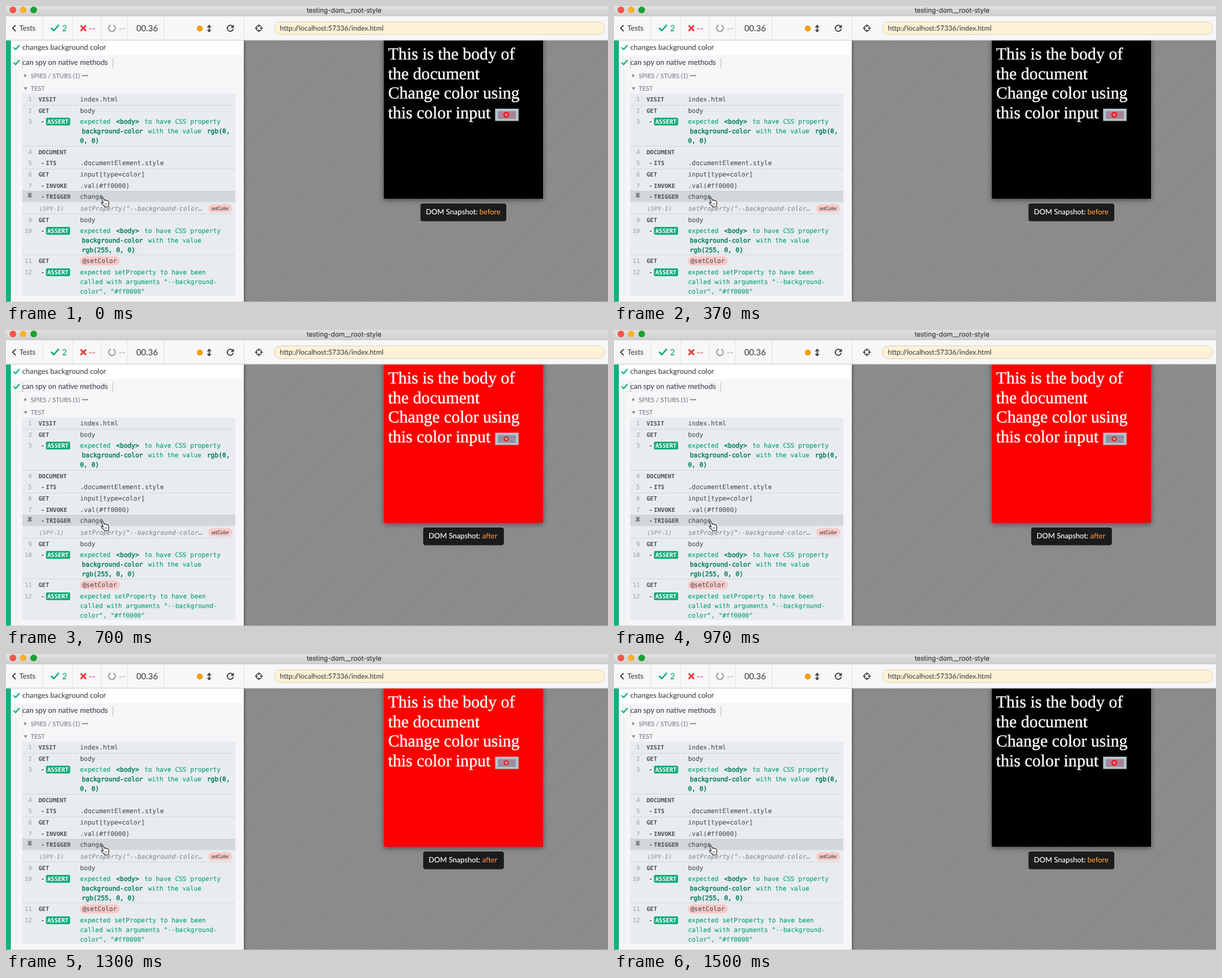
Animation, 1000 px wide and 493 px high, one loop 1530 ms. Source, as an HTML page:

```html
<!DOCTYPE html>
<html lang="en">
<head>
<meta charset="utf-8">
<title>Test runner</title>
<style>
  html, body { margin: 0; width: 100%; height: 100%; overflow: hidden; }
  svg { display: block; width: 1000px; height: 493px; }
  text { font: 12.2px Lato, sans-serif; color: #4a4b50; fill: currentColor; stroke: currentColor; stroke-width: .15; white-space: pre; text-rendering: geometricPrecision; }
  .mono { font: 10.52px "DejaVu Sans Mono", monospace; color: #555a5f; }
  .name { font: bold 9.75px "DejaVu Sans Mono", monospace; color: #4c5055; stroke-width: 0; }
  .num { font: 10px "DejaVu Sans Mono", monospace; color: #a6abb0; }
  .ok { color: #10a575; }
  .code { color: #08805a; stroke-width: .5; }
  .spy { font-style: italic; font-weight: normal; color: #8b9095; }
  .head { font-size: 10.3px; color: #808288; }
  .page { font: 28.1px "Liberation Serif", serif; color: #fff; stroke-width: .4; }
  .line { fill: none; stroke-linecap: round; stroke-linejoin: round; }
</style>
</head>
<body>
<svg viewBox="0 0 1000 493">
  <defs>
    <linearGradient id="bar" x2="0" y2="1">
      <stop stop-color="#e2e1e2"/><stop offset="1" stop-color="#d0cfd0"/>
    </linearGradient>
    <linearGradient id="edge">
      <stop stop-opacity=".28"/><stop offset="1" stop-opacity="0"/>
    </linearGradient>
    <pattern id="hatch" width="3.6" height="3.6" patternUnits="userSpaceOnUse" patternTransform="rotate(45)">
      <rect width="3.6" height="3.6" fill="#929292"/><rect width="1.4" height="3.6" fill="#808080"/>
    </pattern>
    <filter id="shadow" x="-10%" y="-10%" width="120%" height="120%">
      <feDropShadow dx="0" dy="2" stdDeviation="4" flood-opacity=".5"/>
    </filter>
    <path id="check" class="line" d="M1 5l3 3 6-7" stroke="#0fb17c" stroke-width="2.1" stroke-linecap="butt"/>
  </defs>

  <!-- preview -->
  <rect x="395" y="57" width="605" height="436" fill="url(#hatch)"/>
  <rect x="395" y="57" width="5" height="436" fill="url(#edge)"/>
  <rect id="sheet" x="627.7" y="50" width="264.3" height="271" filter="url(#shadow)"/>
  <g id="copy"></g>
  <rect x="812.5" y="171" width="39" height="20.5" fill="#b3c5c9"/>
  <rect id="swatch" x="817.5" y="175.5" width="29" height="12" stroke="#8c9aaa"/>
  <circle id="dot" cx="831" cy="181.3" fill="#e5202a"/>
  <circle cx="831" cy="181.3" r="1.5" fill="#e5202a" stroke="#fff"/>
  <rect id="tip" y="329" height="29.5" rx="4" fill="#1b1b1d"/>
  <text id="label" y="347" style="color:#fff">DOM Snapshot: <tspan id="state"></tspan></text>

  <!-- test list -->
  <rect y="57" width="395" height="436" fill="#f6f5f8"/>
  <rect x="8" y="57" width="387" height="25" fill="#fff"/>
  <rect y="57" width="8" height="436" fill="#0fb17c"/>
  <path d="M16.5 105V490" stroke="#e4e4e8"/>
  <use href="#check" x="12" y="64.5"/>
  <use href="#check" x="12" y="89.5"/>
  <text x="27" y="73">changes background color</text>
  <text x="27" y="98">can spy on native methods</text>
  <path d="M27.5 87V103M177.5 87V103" stroke="#777" stroke-dasharray="1 1.5"/>
  <path d="M30.5 113l4 3-4 3zM29 135.5h7l-3.5 4z" fill="#85878c"/>
  <text class="head" x="41" y="119.5">SPIES / STUBS (1)</text>
  <path class="line" d="M128 116h.01m3.3 0h.01m3.3 0h.01" stroke="#77797e" stroke-width="2.6"/>
  <text class="head" x="41" y="140.5">TEST</text>
  <rect x="27" y="146" width="354" height="337" fill="#e8ecef"/>
  <path d="M27 165.5h354M27 233.5h354M27 271.5h354M27 346.5h354M27 414.5h354" stroke="#d3d8dc"/>
  <rect x="27" y="308" width="354" height="18.5" fill="#d2d7da"/>
  <path d="M27 308.5h354" stroke="#c6ccd0"/>
  <path d="M36 311.5h7v1.5h-1v3l2 2.5h-4l-.5 4-.5-4h-4l2-2.5v-3h-1z" fill="#7d8388"/>
  <rect x="336" y="330" width="40" height="14" rx="7" fill="#f9cbc9"/>
  <text x="341" y="340" style="font-size:8.5px;font-style:italic">setColor</text>
  <rect x="123" y="417" width="66" height="15" rx="7.5" fill="#f9c9c7"/>
  <g id="log"></g>
  <path d="M0 492.5h1000" stroke="#c3c3c6" opacity=".6"/>

  <!-- pointer -->
  <g transform="translate(-17.6 -31) scale(1.1)">
    <path class="line" d="M160.5 318.5c1-1 2.2-.3 2.5.6l1.2 3.3c.8-.8 1.8-.6 2.2.2.9-.6 1.7-.2 2.1.5.9-.5 1.6 0 1.9.8l1 3.2c.2 1.2 0 2-.7 3v1.9h-5.7l-.6-1.3c-1.6-.9-2.8-2.3-4.2-3.7-.8-1 .4-2 1.4-1.4l1.3.8-2.3-6.3c-.2-.6-.4-1.2-.1-1.6z" style="fill:#fff" stroke="#222"/>
    <path d="M165.500 327l.8 2.5m1.3-3l.8 2.5" stroke="#222" stroke-width=".8"/>
  </g>

  <!-- window and toolbar -->
  <rect width="1000" height="16" fill="url(#bar)"/>
  <circle cx="11.5" cy="6.5" r="5.5" fill="#f9534b"/>
  <circle cx="28.5" cy="6.5" r="5.5" fill="#f8b22c"/>
  <circle cx="46" cy="6.5" r="5.5" fill="#16a22c"/>
  <text x="561.5" y="11" text-anchor="middle" style="font:11px Inter,sans-serif;color:#3b3b3b">testing-dom__root-style</text>
  <rect y="16" width="1000" height="41" fill="#f7f6f8"/>
  <path d="M0 16.5h1000M0 57h1000" stroke="#c9c8ca"/>
  <path d="M61.5 17V57M110.5 17V57M158.5 17V57M201.5 17V57M262.5 17V57M395.5 17V57" stroke="#e3e2e6"/>
  <path class="line" d="M15.5 32.5l-4.5 4.5 4.5 4.5" stroke="#444" stroke-width="1.8"/>
  <text x="22" y="41">Tests</text>
  <use href="#check" transform="translate(74.5 31) scale(1.25)"/>
  <text x="93" y="41.7" style="font-size:14px;color:#0fa673">2</text>
  <path d="M124 32.5l9 9m0-9l-9 9" stroke="#e23a34" stroke-width="2.7"/>
  <path d="M138 38h4.3m1.4 0h4.3" stroke="#e23a34" stroke-width="1.2"/>
  <circle cx="176" cy="37" r="5.6" fill="none" stroke="#9b9ca0" stroke-width="1.9" stroke-dasharray="30 5.2" transform="rotate(-65 176 37)"/>
  <path d="M188 38h4.3m1.4 0h4.3" stroke="#9b9ca0" stroke-width="1.2"/>
  <text x="216.5" y="41.7" style="font-size:14px">00.36</text>
  <circle cx="322" cy="37.5" r="5" fill="#f5a010"/>
  <path class="line" d="M337.5 32.5v10m-2.5-7.5l2.5-2.8 2.5 2.8m-5 5l2.5 2.8 2.5-2.8" stroke="#333" stroke-width="1.6"/>
  <path class="line" d="M376.5 34a5 5 0 1 0 .8 4.8" stroke="#3d3d40" stroke-width="1.8"/>
  <path d="M378.5 31v5.5h-5.5z" fill="#3d3d40"/>
  <circle cx="420" cy="37" r="4.5" fill="none" stroke="#3d3d40" stroke-width="1.5"/>
  <path d="M420 30.5v4.5m0 4v4.5M413.5 37h4.5m4 0h4.5" stroke="#3d3d40" stroke-width="1.5"/>
  <rect x="445.5" y="26.5" width="549" height="21" rx="10.5" fill="#fdf1d6" stroke="#ddd5bd"/>
  <text x="455" y="40.7" style="font-size:11.6px">http://localhost:57336/index.html</text>
</svg>
<script>
const $ = id => document.getElementById(id);
const make = (parent, tag, attrs, content = "") => {
  const el = document.createElementNS("http://www.w3.org/2000/svg", tag);
  for (const k in attrs) el.setAttribute(k, attrs[k]);
  el.textContent = content;
  parent.append(el);
};
const write = (cls, x, y, s) => make($("log"), "text", { class: cls, x, y }, s);

// centre line, number, command; a leading "-" marks a child command
const commands = [
  [155, 1, "VISIT", "index.html"],
  [174, 2, "GET", "body"],
  [192, 3, "-ASSERT"],
  [243, 4, "DOCUMENT"],
  [261, 5, "-ITS", ".documentElement.style"],
  [280, 6, "GET", "input[type=color]"],
  [299, 7, "-INVOKE", ".val(#ff0000)"],
  [317, "", "-TRIGGER", "change"],
  [356, 9, "GET", "body"],
  [374, 10, "-ASSERT"],
  [424, 11, "GET"],
  [443, 12, "-ASSERT"]
];
for (const [y, num, cmd, msg = ""] of commands) {
  const child = cmd[0] === "-", badge = cmd === "-ASSERT";
  write("num", num > 9 ? 31 : 37, y + 3.7, num);
  if (badge) make($("log"), "rect", { x: 66.5, y: y - 6, width: 40, height: 13, rx: 2, fill: "#10ad7a" });
  if (child) write("name", 58, y + 4.2, "-");
  write("name", child ? 66.3 + badge * 2.4 : 54, y + 4.2, child ? cmd.slice(1) : cmd);
  if (badge) $("log").lastChild.style.color = "#fff";
  write("mono", 123, y + 3.5, msg);
}
write("name spy", 55, 341, "(SPY-1)");
write("mono spy", 123.5, 340.5, 'setProperty("--background-color…');
write("mono", 127, 428, "@setColor");

for (const [y, end] of [[192, "rgb(0,"], [374, ""]]) {
  write("mono ok", 123, y + 3.5, "expected");
  write("mono code", 183, y + 3.5, "<body>");
  write("mono ok", 230, y + 3.5, "to have CSS property");
  write("mono code", 126, y + 19.5, "background-color");
  write("mono ok", 236, y + 19.5, "with the value");
  write("mono code", 334, y + 19.5, end);
}
write("mono code", 123, 227.5, "0, 0)");
write("mono code", 126, 409.5, "rgb(255, 0, 0)");
["expected setProperty to have been", 'called with arguments "--background-', 'color", "#ff0000"']
  .forEach((s, i) => write("mono ok", 123, 446.5 + i * 16, s));
["This is the body of", "the document", "Change color using", "this color input"]
  .forEach((s, i) => make($("copy"), "text", { class: "page", x: 634.7, y: 89.3 + i * 32.5 }, s));

const set = (id, attrs) => {
  for (const k in attrs) $(id).setAttribute(k, attrs[k]);
};
const start = performance.now();
function draw() {
  const t = (performance.now() - start) % 1530;
  const after = t >= 700 && t < 1500;
  set("sheet", { fill: after ? "#ff0000" : "#000" });
  set("swatch", { fill: after ? "#9b8ca2" : "#b08198" });
  set("dot", { r: after ? 4.3 : 5 });
  set("tip", after ? { x: 693, width: 134 } : { x: 688.5, width: 142.5 });
  set("label", { x: after ? 702 : 697.5 });
  set("state", { color: after ? "#f58a4a" : "#f5a02c" });
  $("state").textContent = after ? "after" : "before";
  requestAnimationFrame(draw);
}
draw();
</script>
</body>
</html>
```
